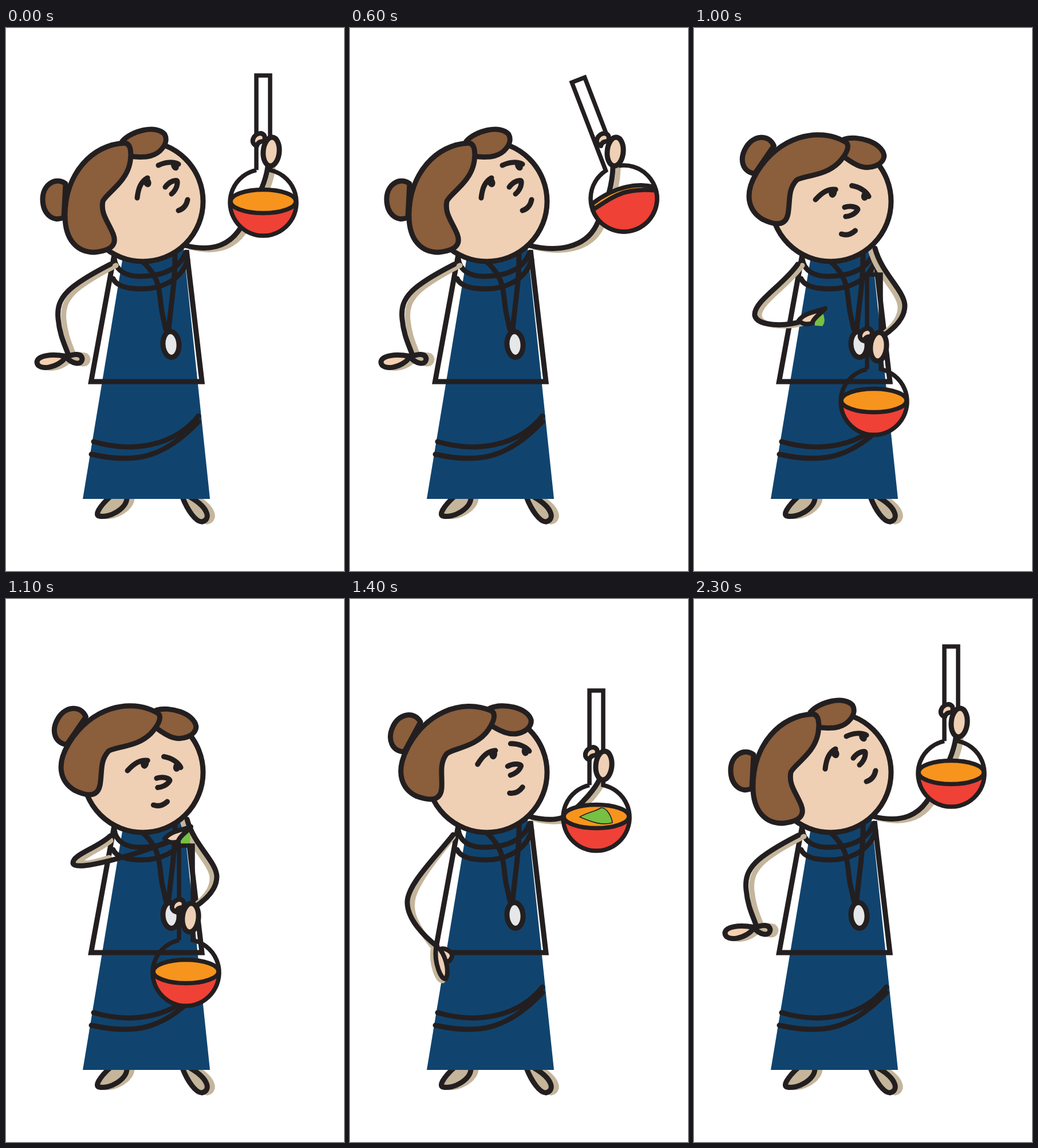
An HTML page for the animation above (2.5 s loop, 590 px wide and 949 px high).

```html
<!DOCTYPE html>
<html lang="en">
<head>
<meta charset="utf-8">
<title>Chemist</title>
<style>
html, body { margin: 0; width: 100%; height: 100%; overflow: hidden; background: #fff }
svg { display: block; width: 590px; height: 949px }
</style>
</head>
<body>
<svg id="stage" viewBox="0 0 590 949"></svg>
<script>
const INK = '#231f20', SKIN = '#efd0b5', BROWN = '#8b5e3c', TAN = '#c4b59b';
const BLUE = '#10446f', RED = '#ef4136', ORANGE = '#f7941d', GREEN = '#76c043';

const path = (d, fill = 'none', width = 9, ink = INK) =>
  `<path d="${d}" fill="${fill}" stroke="${ink}" stroke-width="${width}" stroke-linecap="round" stroke-linejoin="round"/>`;
const oval = (x, y, rx, ry, fill, width = 9, turn = 0) =>
  `<ellipse cx="${x}" cy="${y}" rx="${rx}" ry="${ry}" fill="${fill}" stroke="${INK}" stroke-width="${width}" transform="rotate(${turn} ${x} ${y})"/>`;
const group = (transform, inner) => `<g transform="${transform}">${inner}</g>`;
const shadow = (d, x, y, fill = 'none') => group(`translate(${x} ${y})`, path(d, fill, 9, TAN));

const feet = 'M182,819C163,836 154,852 163,853C180,857 212,840 211,820M308,820C317,843 331,863 342,863C357,860 356,840 322,820';
const body = shadow(feet, 9, 0, TAN) + path(feet) +
  `<path d="M204,400L134,823H356L310,385Z" fill="${BLUE}"/>` +
  `<path d="M189,396L148.500,618H342L315,388" fill="none" stroke="${INK}" stroke-width="9"/>` +
  path('M153,723C215,741 290,735 336,678M149,745C225,762 275,752 336,688') +
  path('M189,403C192,426 212,434 235,434C275,434 303,420 314,392M187,438C193,452 215,456 238,456C280,455 308,435 317,405') +
  path('M238,408C274,440 266,468 273,500L279,527M295,392C296,440 288,480 284,527') +
  oval(288, 553, 14, 22.5, '#e6e7e8', 9, -4);

const hair = path('M104,272C85,259 64,275 64,299C64,325 82,340 101,331Z', BROWN) +
  path('M203,198C218,180 262,168 277,186C285,200 270,222 245,225C232,226 222,225 216,224Z', BROWN) +
  path('M208,201C150,203 104,255 103,325C102,372 126,392 154,392C185,389 194,378 187,360C178,338 165,325 169,303C173,290 212,270 217,232C219,216 218,203 208,201Z', BROWN);
const face = path('M229,297C231,279 236,268 247,262M266,240C278,234 292,233 301,238M278,278C285,268 298,264 299,268C300,278 293,287 289,290M301,319Q314,315 317,300') +
  `<ellipse cx="246" cy="269" rx="7" ry="9.500" fill="${INK}" transform="rotate(-25 246 269)"/>` +
  `<ellipse cx="295" cy="241" rx="6.500" ry="8.500" fill="${INK}" transform="rotate(-25 295 241)"/>`;

// Hair and face turn by separate amounts: [angle, dx, dy]
const up = { hair: [0, 0, 0], face: [0, 0, 0] };
const level = { hair: [25.5, 23, -28.5], face: [25, -12.5, 8] };
const down = { hair: [31.5, 38.5, -31], face: [36, -28, 25] };
const turn = ([a, x, y], pivot) => `translate(${x} ${y}) rotate(${a} ${pivot})`;
const head = h => `<circle cx="239" cy="303" r="105" fill="${SKIN}" stroke="${INK}" stroke-width="9"/>` +
  group(turn(h.hair, '165 249'), hair) + group(turn(h.face, '268.5 303'), face);

const outArm = 'M182,413C110,450 87,470 91,508C94,540 104,556 109,572';
const outHand = 'M105,574C80,569 55,572 54,584C55,600 92,595 105,574';
const outThumb = 'M105,575C115,571 131,566 133,578C132,591 115,587 105,575';
const hipHand = 'M150,610C147,635 158,665 167,664C173,655 170,630 157,612';
const reachArm = 'M182,414C160,435 115,447 117,462C120,478 230,446 283,424';
const liftArm = 'M181,413C155,450 104,478 106,502C110,522 160,522 190,512';
const reachHand = path('M277,419C288,405 308,404 323,398C318,406 304,412 300,424C290,427 282,425 277,419Z', SKIN, 8);
const pinch = `<path d="M305,411L319,406Q325,421 318,429L305,428Z" fill="${GREEN}"/>`;
const moved = inner => group('translate(-94 92)', inner);
const left = {
  out: shadow(outArm, 10, 2) + shadow(outHand + outThumb, 10, 1, TAN) + path(outArm) +
    path(outThumb, TAN) + path(outHand, '#f5d0b0'),
  hip: path('M180,416C160,441 110,500 109,530C105,555 125,582 143,606', 'none', 9, TAN) +
    shadow(hipHand, -5, 3, TAN) + path('M180,412C148,453 100,499 100,530C100,560 130,590 152,607') +
    path('M155,613C165,607 180,617 178,625C175,634 168,637 162,630', SKIN, 8) + path(hipHand, SKIN, 8),
  reach: path('M182,422C165,436 128,450 126,462C140,465 165,458 180,453', 'none', 11, TAN) +
    path(reachArm) + pinch + reachHand,
  carry: shadow(liftArm, 8, 2) + path(liftArm) + moved(pinch + reachHand),
  empty: shadow(liftArm, 8, 2) + path(liftArm) + moved(reachHand)
};

const levelDrink = `<path d="M-58,-2A58,58 0 0 0 58,-2Z" fill="${RED}"/>` + oval(0, -2, 57, 20.5, ORANGE, 7.5);
const tiltDrink = path('M-54,-20C-25,-28 15,-22 55,9L54.400,20C15,-5 0,-19 -56.300,-14Z', ORANGE, 7.5) +
  path('M-56.300,-14C0,-19 15,-5 54.400,20A58,58 0 0 1 -56.300,-14Z', RED, 7.5);
const leaf = path('M-29,-1C-17,-9 0,-11 8,-17C19,-18 27,0 28,9C10,14 -5,9 -29,-1Z', GREEN, 1.6);
const glass = `<path d="M-12,-56.700V-222H12V-56.700A58,58 0 1 1 -12,-56.700" fill="none" stroke="${INK}" stroke-width="7.5"/>`;

function flask(p) {
  const drink = p.tilt ? tiltDrink : levelDrink;
  const [hx, hy] = p.hand;
  return group(`translate(${p.bulb}) scale(${p.tilt < 0 ? -1 : 1} 1)`,
      drink + (p.leaf ? leaf : '') + group(`rotate(${Math.abs(p.tilt || 0)})`, glass)) +
    group(`translate(${hx} ${hy})`,
      path('M-25,-10C-40,-15 -29,-33 -18,-32C-10,-30 -10,-23 -13,-18C-20,-18 -24,-15 -25,-10Z', SKIN, 8) +
      oval(0, 0, 14, 25, SKIN, 9, 5));
}

const high = { head: up, left: left.out, bulb: [449, 305], hand: [463, 216], shade: [9, 3],
  arm: 'M313,380C360,392 392,380 412,345C430,312 452,280 457,242' };
const swirl = { ...high, bulb: [420, 298], hand: [460, 218], tilt: 21,
  arm: 'M313,380C350,388 385,390 390,345C395,310 425,295 456,242' };
const swirlBack = { ...high, bulb: [478, 298], tilt: -21,
  arm: 'M313,380C360,392 410,385 430,345C445,315 458,280 459,242' };
const study = { head: level, left: left.hip, bulb: [430, 382], hand: [443, 291], shade: [7, 4],
  arm: 'M313,380C350,390 375,385 388,372C406,356 428,332 435,316' };
const lower = { head: down, left: left.hip, bulb: [366, 587], hand: [376, 493], shade: [-8, 3],
  arm: 'M314,380C335,420 398,435 402,462C403,475 392,480 382,478' };
const low = { head: down, left: left.carry, bulb: [314, 653], hand: [322, 557], shade: [-8, 3],
  arm: 'M316,385C328,430 367,458 368,485C368,510 345,528 330,538' };

const steps = [
  [0, high], [400, swirl], [600, swirlBack], [800, study], [900, lower], [1000, low],
  [1100, { ...low, left: left.reach }], [1200, { ...low, left: left.empty, leaf: true }],
  [1300, { ...lower, leaf: true }], [1400, { ...study, leaf: true }],
  [1900, swirl], [2100, swirlBack], [2300, high]
];

const stage = document.getElementById('stage');
const start = performance.now();
let shown;
function draw() {
  const t = (performance.now() - start) % 2500;
  const pose = steps.findLast(([from]) => from <= t)[1];
  if (pose !== shown) {
    shown = pose;
    stage.innerHTML = body + shadow(pose.arm, ...pose.shade) + path(pose.arm) +
      head(pose.head) + pose.left + flask(pose);
  }
  requestAnimationFrame(draw);
}
draw();
</script>
</body>
</html>
```
